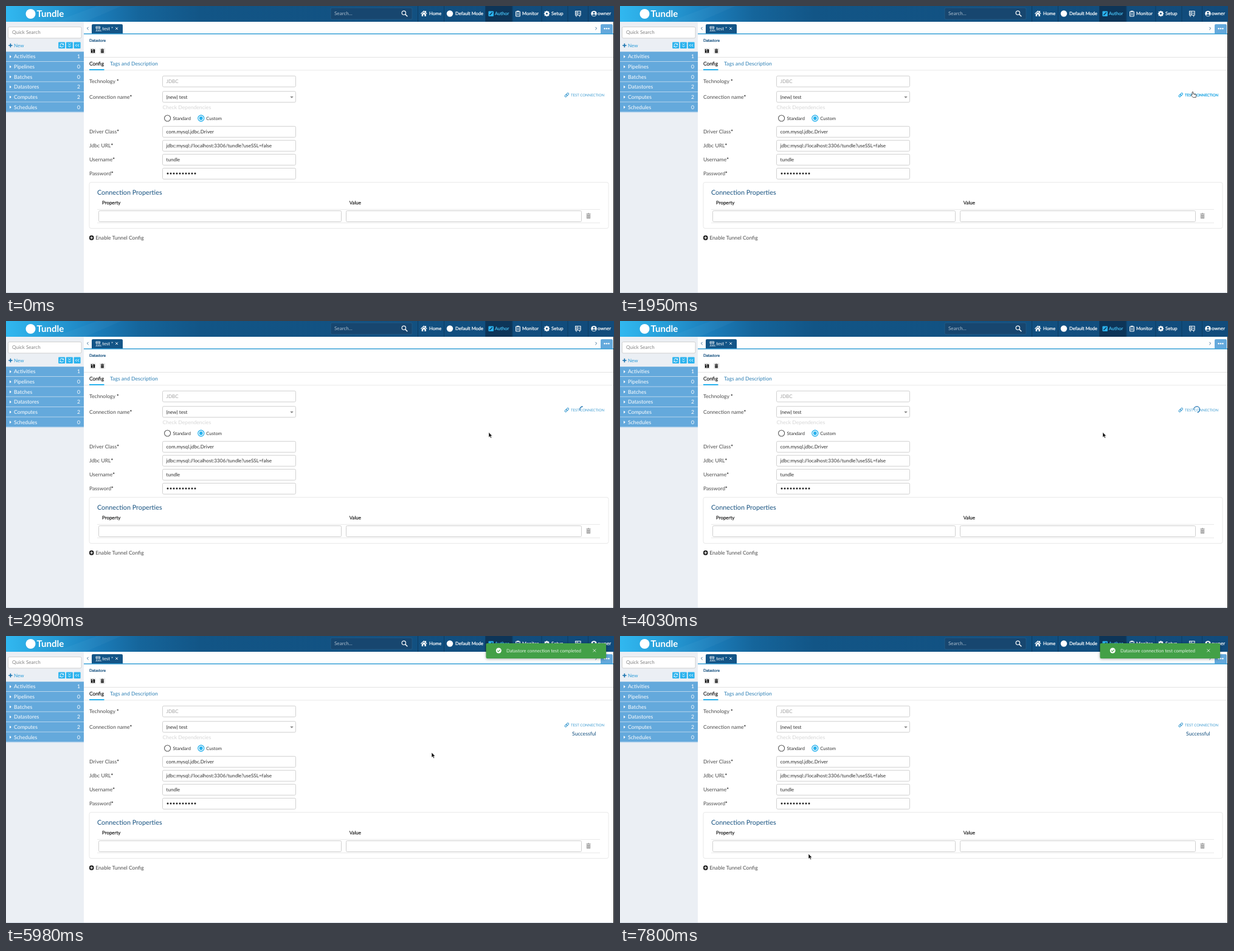
An HTML page for the animation above (8000 ms loop, 1000x473 px).

```html
<!DOCTYPE html>
<html lang="en">
<head>
<meta charset="utf-8">
<title>Datastore connection test</title>
<style>
  html, body { margin: 0; width: 100%; height: 100%; overflow: hidden; background: #fff; }
  svg { display: block; width: 100vw; height: 100vh; }
  text { font-family: Lato, "Open Sans", sans-serif; text-rendering: geometricPrecision; white-space: pre; }
  .medium { stroke: currentColor; stroke-width: .22px; }
  #toast { filter: drop-shadow(0 1px 2px rgba(0, 0, 0, .35)); }
</style>
</head>
<body>
<svg id="stage" viewBox="0 0 1000 473" xmlns="http://www.w3.org/2000/svg"></svg>
<script>
const LOOP = 8000, TICK = 130;
const NAVY = '#14507f', SKY = '#2bb3ee', ROW = '#64a9dc', LINK = '#3d9bd0', INK = '#4c4c4c';

const rect = (x, y, w, h, fill, more = '') =>
  `<rect x="${x}" y="${y}" width="${w}" height="${h}" fill="${fill}" ${more}/>`;
const circle = (x, y, r, fill, more = '') => `<circle cx="${x}" cy="${y}" r="${r}" fill="${fill}" ${more}/>`;
const path = (d, fill, more = '') => `<path d="${d}" fill="${fill}" ${more}/>`;
const line = (d, color, width = 1, more = '') =>
  path(d, 'none', `stroke="${color}" stroke-width="${width}" ${more}`);
const text = (x, y, size, str, fill = INK, more = '') =>
  `<text x="${x}" y="${y}" font-size="${size}" fill="${fill}" ${more}>${str}</text>`;
const medium = (x, y, size, str, fill) => text(x, y, size, str, fill, `class="medium" color="${fill}"`);
const box = (x, y, w, h, stroke = '#d0d0d0', r = 2) =>
  rect(x + .5, y + .5, w - 1, h - 1, '#fff', `rx="${r}" stroke="${stroke}"`);
const at = (x, y, body) => `<g transform="translate(${x} ${y})">${body}</g>`;

const trash = (x, y, color, size = 1) => at(x, y, `<g transform="scale(${size})">` +
  rect(-3.2, -3.2, 6.4, 1, color) + rect(-1.2, -4, 2.4, 1, color) +
  path('M-2.7-1.7H2.7V4H-2.7Z', color) +
  line('M-1.1-.8V3M1.1-.8V3', '#fff', .5) + '</g>');

const chain = (x, y) => at(x, y, '<g transform="rotate(-45)">' +
  [-4, -.4].map(left => rect(left, -1.5, 4.4, 3, 'none', 'rx="1.5" stroke="currentColor" stroke-width="1"')).join('') + '</g>');

function header() {
  const gear = Array.from({ length: 8 }, (_, i) =>
    rect(-1, -4.7, 2, 3, '#fff', `transform="rotate(${i * 45})"`)).join('');
  return rect(0, 0, 1000, 26, 'url(#bar)') +
    path('M150 0H190L130 26H80Z', '#fff', 'opacity=".03"') +
    circle(40.5, 13, 8, '#fff') +
    text(50.5, 18.3, 15, 'Tundle', '#fff', 'font-weight="700"') +
    rect(534, 3, 134, 19, '#17466f', 'rx="2" stroke="#2a648f" stroke-width=".6"') +
    text(540, 15.3, 8.1, 'Search...', '#a9bccd') +
    circle(654.3, 11.3, 3.2, 'none', 'stroke="#fff" stroke-width="1.2"') +
    line('M656.7 13.7L660.3 17.3', '#fff', 1.5) +
    rect(789, 0, 43.5, 26, '#0d3558') +
    [677.5, 720.5, 788.5, 833, 881, 924, 957.5].map(x => line(`M${x} 0V26`, '#0c3c63', 1)).join('') +
    path('M682 12.4L687.3 7.6L689.5 9.6V8H691V11L692.6 12.4L691.7 13.3L687.3 9.3L682.9 13.3Z', '#fff') +
    path('M683.7 13.4L687.3 10.2L690.9 13.4V17H688.4V14H686.2V17H683.7Z', '#fff') +
    medium(696, 15, 7.55, 'Home', '#fff') +
    circle(730, 12.5, 5.2, '#fff') +
    medium(739, 15, 7.55, 'Default Mode', '#fff') +
    rect(793.5, 8.5, 8.5, 8.5, SKY, 'rx="1"') +
    line('M795.5 15L800 10.5', '#0d3558', 1.4) +
    medium(804, 15, 7.6, 'Author', '#46bdf0') +
    rect(838.7, 9, 6.6, 8, 'none', 'rx=".8" stroke="#fff" stroke-width="1.2"') +
    rect(840.4, 7.8, 3.2, 2, '#fff') +
    line('M840.2 12H843.8M840.2 14.3H843.8', '#fff', .9) +
    medium(849, 15, 7.55, 'Monitor', '#fff') +
    at(889.5, 12.6, gear + circle(0, 0, 3.5, '#fff') + circle(0, 0, 1.5, NAVY)) +
    medium(897, 15, 7.7, 'Setup', '#fff') +
    rect(936.5, 8.5, 8.6, 6.6, 'none', 'stroke="#fff" stroke-width="1"') +
    line('M936.5 11.8H945M938 10.2H941M938 13.5H941M938 15V18M943.6 15V18', '#fff', .9) +
    circle(967, 12.6, 4.7, '#fff') + circle(967, 11, 1.6, NAVY) +
    path('M964 15.6Q964.4 13.4 967 13.4T970 15.6Q967 17.4 964 15.6Z', NAVY) +
    medium(973, 15, 7.9, 'owner', '#fff');
}

function sidebar() {
  const rows = [['Activities', 1], ['Pipelines', 0], ['Batches', 0], ['Datastores', 2], ['Computes', 2], ['Schedules', 0]];
  const pitch = 16.65;
  const buttons = [86.2, 98.9, 111.6].map(x => rect(x, 59.5, 11, 10.6, SKY, 'rx="1"')).join('');
  return rect(0, 26, 128, 447, '#ebeff4') +
    box(3, 34, 121.5, 19.5) + text(10, 46.3, 8.1, 'Quick Search', '#858585') +
    line('M4.2 65H10.6M7.4 61.8V68.2', '#1670ad', 1.6) +
    text(13, 67.9, 8, 'New', '#2a9bd8') + buttons +
    line('M89 64.2A2.8 2.8 0 0 1 94 63M94.4 65.4A2.8 2.8 0 0 1 89.4 66.6', '#fff', 1) +
    path('M95 61.4V64H92.5ZM88.5 68.2V65.6H91Z', '#fff') +
    line('M102.4 62L104.4 63.9L106.4 62M102.4 65.6L104.4 67.5L106.4 65.6', '#fff', 1) +
    line('M116.4 62.8L114.4 64.8L116.4 66.8M119.9 62.8L117.9 64.8L119.9 66.8', '#fff', 1) +
    rows.map(([name, count], i) => at(0, 75.3 + i * pitch,
      rect(0, 0, 128, pitch, ROW) + line(`M0 ${pitch - .4}H128`, '#d3e5f4', .8) +
      path('M6 5.8L8.8 8.2L6 10.6Z', '#fff') +
      text(13, 11.2, 8.7, name, '#fff') +
      text(122, 11.2, 8.7, count, '#fff', 'text-anchor="end"'))).join('');
}

function tabs() {
  return rect(128, 26, 872, 20, '#fdfefe') +
    line('M135.6 34.8L133.4 37L135.6 39.2M969.4 34.8L971.6 37L969.4 39.2', '#3a6f98', 1) +
    path('M141 46V32Q141 30 143 30H190Q192 30 192 32V46Z', '#135587') +
    line('M148 33.8H154.6V37H148ZM148 35.4H154.6M149 37V38.4M153.6 37V38.4', '#fff', .7) +
    text(147, 42.3, 4.3, 'JDBC', '#fff') +
    text(158.3, 39.5, 7.6, 'test *', '#fff') +
    line('M180.2 35.2L184 39M184 35.2L180.2 39', '#fff', .9) +
    path('M978 46V32Q978 30 980 30H996Q998 30 998 32V46Z', ROW) +
    [984.6, 988, 991.4].map(x => circle(x, 37.3, 1.2, '#fff')).join('') +
    rect(128, 45.2, 872, 1.4, '#2b9bd5') +
    medium(137, 59, 6.25, 'Datastore', NAVY) +
    rect(138, 69, 10, 10, '#f0f0f0', 'rx="1.5"') + rect(153.5, 69, 10, 10, '#f0f0f0', 'rx="1.5"') +
    path('M139.8 71H145L146.2 72.2V77.2H139.8Z', '#111') +
    rect(141, 71.7, 3, 1.5, '#fff') + circle(143, 75.4, 1, '#fff') +
    trash(158.5, 74, '#111', .85) +
    line('M128 84.5H1000', '#e2e2e2') +
    medium(137, 98.4, 8.4, 'Config', '#222') +
    text(171, 98.4, 8.65, 'Tags and Description', '#2f80b5') +
    line('M128 105.8H1000', '#e4e4e4', .8) + rect(137, 104, 24.5, 2, SKY);
}

function form() {
  const field = (y, label, value, color = '#333') =>
    text(137, y + 2.8, 8.6, `${label}<tspan font-weight="700" fill="#222">*</tspan>`) +
    box(257, y - 9.5, 220, 19) + text(263.5, y + 2.8, 8.1, value, color);
  const dots = Array.from({ length: 10 }, (_, i) => circle(266 + i * 5, 276, 1.5, '#222')).join('');
  return field(124.3, 'Technology ', 'JDBC', '#a3a3a3') +
    field(149.7, 'Connection name', '(new) test') + path('M467.3 149H472.7L470 152Z', '#8a8a8a') +
    text(257.5, 169.6, 8.62, 'Check Dependencies', '#d6d6d6') +
    circle(265.6, 185, 5, '#fff', 'stroke="#555" stroke-width="1.1"') +
    text(274.5, 187.6, 7.55, 'Standard', '#333') +
    circle(320.8, 185, 5, '#fff', `stroke="${SKY}" stroke-width="1.3"`) + circle(320.8, 185, 2.9, SKY) +
    text(329.3, 187.6, 7.55, 'Custom', '#333') +
    field(207.3, 'Driver Class', 'com.mysql.jdbc.Driver') +
    field(230.3, 'Jdbc URL', 'jdbc:mysql://localhost:3306/tundle?useSSL=false') +
    field(253.3, 'Username', 'tundle') + field(276.3, 'Password', '') + dots +
    box(136.5, 290, 855, 77, '#e9e9e9', 3) +
    text(150, 310.6, 10.8, 'Connection Properties', NAVY) +
    medium(158, 327.2, 7.95, 'Property', '#222') + medium(564.7, 327.2, 7.95, 'Value', '#222') +
    line('M150 335.3H977M150 357.4H977', '#e3e3e3', .8) +
    box(152, 337, 400, 19) + box(559, 337, 388, 19) + trash(958, 345.8, '#a2a2a2', 1.15) +
    circle(140.7, 382, 3.9, '#222') + line('M138.4 382H143M140.7 379.7V384.3', '#fff', 1.1) +
    text(147.2, 384.7, 8.65, 'Enable Tunnel Config');
}

const overlays = () =>
  `<g id="link" color="${LINK}">${chain(922.3, 146.6)}${text(929, 148.6, 6.02, 'TEST CONNECTION', 'currentColor')}</g>` +
  '<path id="spinner" fill="none" stroke="#2678b4" stroke-width="1.3"/>' +
  `<g id="result">${text(931, 163.6, 8.7, 'Successful', NAVY)}` +
  `<g id="toast">${rect(789.5, 12, 197.5, 25, '#43a047', 'rx="2"')}</g>` +
  circle(810.3, 24, 4.5, '#fff') + line('M808 24L809.8 25.8L812.8 22.6', '#43a047', 1.1) +
  text(823, 26.6, 7.56, 'Datastore connection test completed', '#e3f3e4') +
  line('M965.4 21.6L970.2 26.4M970.2 21.6L965.4 26.4', '#e3f3e4', .9) + '</g>' +
  `<g id="arrow">${path('M0 0V8.2L1.9 6.5L3.2 9.4L4.6 8.8L3.3 6H5.8Z', '#111', 'stroke="#fff" stroke-width=".5"')}</g>` +
  `<g id="hand">${path('M0 .9Q1 -.3 1.8 .9V3.6L5.8 4.4Q7 4.7 6.8 6L6.2 9.6H1.4L-1.9 6Q-1.6 4.7 0 5.6Z',
    '#fff', 'stroke="#333" stroke-width=".8"')}${line('M3.3 4V5.6M5 4.4V5.8', '#333', .6)}</g>`;

const stage = document.getElementById('stage');
stage.innerHTML = `<defs><linearGradient id="bar">
  <stop offset="0" stop-color="#31b8f0"/><stop offset=".07" stop-color="#279fd9"/>
  <stop offset=".15" stop-color="#1b7dba"/><stop offset=".22" stop-color="#15659b"/>
  <stop offset=".32" stop-color="#125586"/><stop offset="1" stop-color="#114b7b"/></linearGradient></defs>` +
  rect(0, 0, 1000, 473, '#fff') + header() + sidebar() + tabs() + form() +
  line('M0 472.6H1000', '#bfcbd6', .8) + rect(999, 26, 1, 447, '#111') + overlays();

const [link, spinner, result, arrow, hand] =
  ['link', 'spinner', 'result', 'arrow', 'hand'].map(id => document.getElementById(id));
const show = (el, on) => el.setAttribute('visibility', on ? 'visible' : 'hidden');

// Pointer strokes: [first ms, last ms, from, to]; the pointer rests between them.
const moves = [
  [260, 910, [430, 268], [941, 141]],
  [2080, 2730, [941, 141], [794, 183.5]],
  [5980, 6110, [700, 192], [510, 201]],
  [7020, 7150, [497, 202.7], [470, 222]],
  [7540, 7800, [420, 272], [310, 359]],
];
const hidden = t => t < 260 || (t >= 4680 && t < 5980);
const ease = p => p * p * (3 - 2 * p);

function pointer(t) {
  const [start, end, from, to] = moves.filter(m => m[0] <= t).pop() || moves[0];
  const p = ease(Math.min(1, Math.max(0, (t - start) / (end - start))));
  return from.map((v, i) => v + (to[i] - v) * p);
}

function arc(t) {
  const rad = Math.PI / 180, dt = t - 2990;
  const start = 160 + dt * .36;
  const sweep = 150 + 130 * Math.sin((197.5 + dt * .27) * rad);
  const point = deg => `${948.6 + 5 * Math.cos(deg * rad)} ${146 + 5 * Math.sin(deg * rad)}`;
  return `M${point(start)}A5 5 0 ${sweep > 180 ? 1 : 0} 1 ${point(start + sweep)}`;
}

function draw(now) {
  const t = Math.floor((now % LOOP) / TICK) * TICK;
  const [x, y] = pointer(t);
  const hover = !hidden(t) && x > 918 && x < 984 && y > 138 && y < 152;
  const busy = t >= 2080 && t < 4680;
  for (const el of [arrow, hand]) el.setAttribute('transform', `translate(${x} ${y})`);
  show(arrow, !hidden(t) && !hover);
  show(hand, hover);
  link.setAttribute('color', hover ? '#17a3e3' : LINK);
  link.setAttribute('class', hover ? 'medium' : '');
  show(spinner, busy);
  if (busy) spinner.setAttribute('d', arc(t));
  show(result, t >= 4680);
}

const begin = performance.now();
function loop() {
  draw(performance.now() - begin);
  requestAnimationFrame(loop);
}
loop();
</script>
</body>
</html>
```
